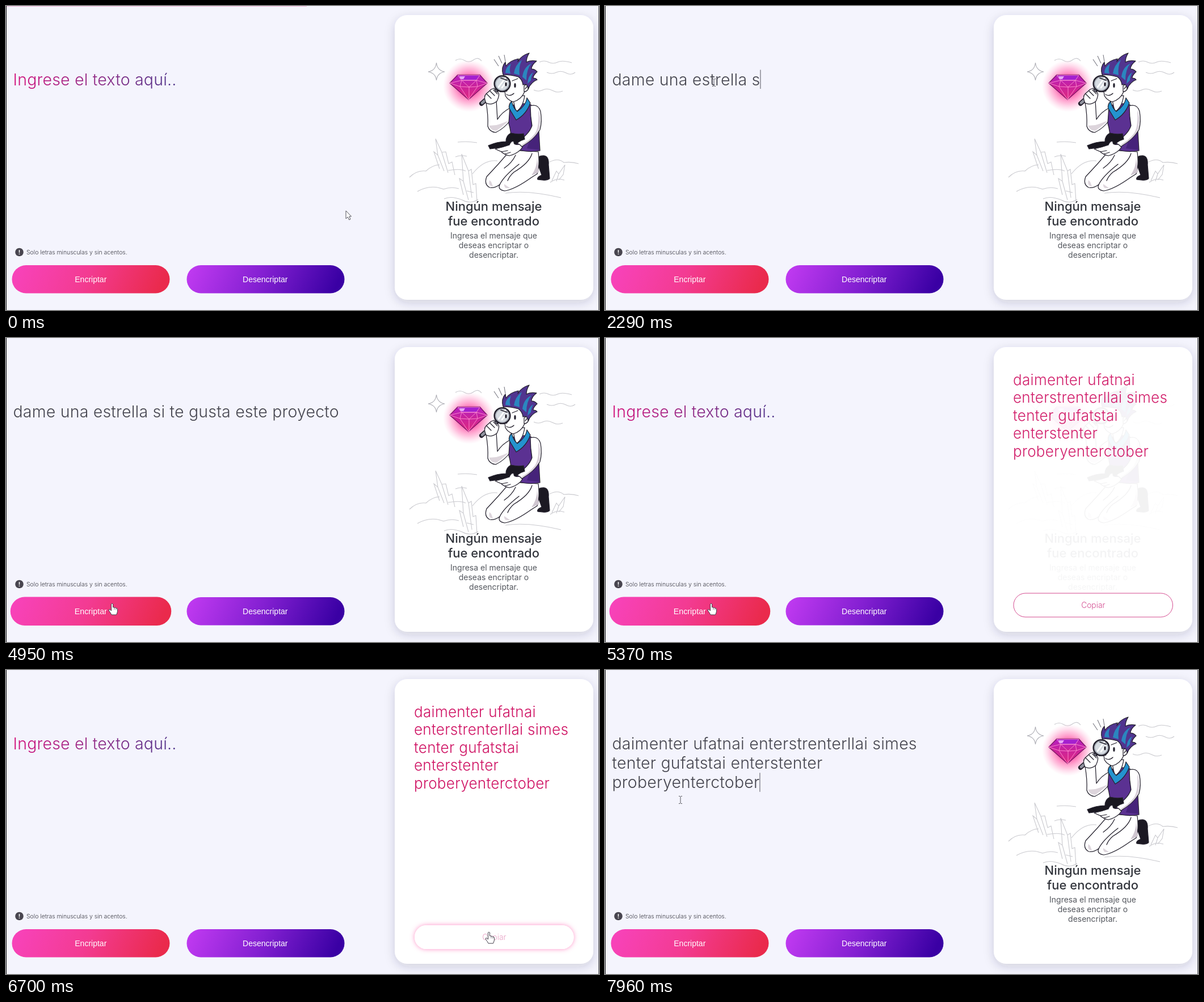
Recreate the animation shown at these times as an HTML page. Size 1045 by 536 pixels, loop 8 s.

```html
<!DOCTYPE html>
<html lang="es">
<head>
<meta charset="utf-8">
<style>
html, body { margin: 0; width: 100%; height: 100%; overflow: hidden; background: #f4f4fd; }
svg { display: block; width: 100%; height: 100%; }
text { font-family: Inter, sans-serif; font-optical-sizing: none; white-space: pre; }
.input { font-size: 28.5px; font-weight: 300; letter-spacing: .2px; fill: #46464f; }
.output { font-size: 26.1px; font-weight: 300; letter-spacing: .25px; fill: #cf1263; }
.title { font-size: 22px; font-weight: 500; fill: #32353c; text-anchor: middle; }
.body { font-size: 14px; fill: #55585f; text-anchor: middle; }
.note { font-size: 10.4px; font-weight: 300; fill: #3c3c44; }
.label { font: 14px "Liberation Sans", Arial, sans-serif; fill: #fff; text-anchor: middle; }
.sketch { fill: none; stroke: #c9c9ce; stroke-width: 1.1; }
.ink { stroke: #25222e; stroke-width: 1.25; stroke-linejoin: round; stroke-linecap: round; }
</style>
</head>
<body>
<svg viewBox="0 0 1045 536" preserveAspectRatio="none">
<defs>
  <linearGradient id="pink" x2="1" y2=".08"><stop stop-color="#f843bd"/><stop offset=".5" stop-color="#f33b92"/><stop offset="1" stop-color="#ea2a4c"/></linearGradient>
  <linearGradient id="violet" x2="1" y2=".08"><stop stop-color="#c33bf2"/><stop offset=".5" stop-color="#8420d2"/><stop offset="1" stop-color="#3a00a4"/></linearGradient>
  <linearGradient id="hint" gradientUnits="userSpaceOnUse" x1="12" y1="0" x2="320" y2="0"><stop stop-color="#d3107c"/><stop offset=".5" stop-color="#8c2a86"/><stop offset="1" stop-color="#403088"/></linearGradient>
  <linearGradient id="gem" x2="0" y2="1"><stop stop-color="#b21fc4"/><stop offset=".4" stop-color="#c8229f"/><stop offset="1" stop-color="#e02a80"/></linearGradient>
  <radialGradient id="halo"><stop offset=".35" stop-color="#ff4fa3" stop-opacity=".9"/><stop offset=".7" stop-color="#ff7dba" stop-opacity=".45"/><stop offset="1" stop-color="#ffb0d5" stop-opacity="0"/></radialGradient>
  <filter id="shade" x="-20%" y="-20%" width="140%" height="140%"><feDropShadow dx="0" dy="5" stdDeviation="8.5" flood-color="#30304a" flood-opacity=".18"/></filter>
  <filter id="glow" x="-20%" y="-60%" width="140%" height="220%"><feDropShadow dx="0" dy="0" stdDeviation="4" flood-color="#ff5fae" flood-opacity=".7"/></filter>
</defs>

<rect width="1045" height="536" fill="#f4f4fd"/>
<path id="topLine" d="M0 .5H530" stroke="#f3b4d8"/>
<path d="M.5 0V536" stroke="#17171c"/>
<path d="M1044.5 0V536" stroke="#55555c"/>
<rect x="685" y="16" width="350" height="502" rx="22" fill="#fff" filter="url(#shade)"/>

<g id="input"></g>
<path id="caret" stroke="#55555f"/>

<circle cx="23.5" cy="434" r="7.3" fill="#48454f"/>
<path d="M23.5 430V435M23.5 436.6V438" stroke="#fff" stroke-width="1.5"/>
<text class="note" x="36" y="438">Solo letras minusculas y sin acentos.</text>

<g id="encrypt"><rect x="10.5" y="457" width="278" height="49.5" rx="24.75" fill="url(#pink)"/><text class="label" x="149.3" y="487">Encriptar</text></g>
<g id="decrypt"><rect x="318.5" y="457" width="278" height="49.5" rx="24.75" fill="url(#violet)"/><text class="label" x="456.8" y="487">Desencriptar</text></g>

<g id="empty">
  <g class="sketch">
    <path d="M758.5 100Q760 114 773 116Q760 118 758.5 131Q757 118 744 116Q757 114 758.5 100Z" stroke="#aaaab2"/>
    <path d="M792 96Q800 91 808 96T824 95T838 97M940 99Q948 95 956 99T972 99T997 100M953 117Q962 121 970 117T987 118T1003 117M930 148Q938 152 946 148T963 149T981 150"/>
    <path d="M796 240Q813 238 830 241M792 266Q802 262 812 265"/>
    <path d="M860 94L868 106M868 88L874 101M878 86L880 98" stroke="#777780"/>
    <path d="M711 302Q724 289 740 291Q752 280 764 280M725 327Q748 314 771 323Q784 318 798 322M779 290Q800 286 810 291M822 296Q842 270 866 273M958 275Q973 267 983 276Q996 274 1009 278M959 311Q971 302 984 307M880 330Q920 324 978 338M772 340Q784 334 804 342Q818 350 832 341"/>
    <path d="M764 287L754 257L761 263L757 234L768 258L775 257L780 278L786 275L791 298M761 263L772 291M768 258L779 294"/>
    <path d="M806 333L799 304L806 309L803 261L815 291L820 288L823 315L828 313L830 345M806 309L815 342M815 291L821 338M812 326L824 329"/>
    <path d="M962 308L970 291L974 296L985 280L982 297L974 307M974 296L970 309"/>
  </g>
  <circle cx="816" cy="141" r="46" fill="url(#halo)"/>
  <g stroke="#ff8fd0" stroke-width=".9" stroke-linejoin="round">
    <path d="M782 136L796 121.500H835L848 136L815 165Z" fill="url(#gem)" stroke="#7d1566" stroke-width="1.300"/>
    <path d="M796 122H835L829 131H803Z" fill="#a420cf"/>
    <path d="M782 136L803 131L829 131L848 136M782 136L800 142L815 165L831 142L848 136M800 142L803 131L816 143L829 131L831 142L816 143L800 142M816 143V165" fill="none"/>
    <path d="M799 124H809L806 129H801Z" fill="#e7a5f5" stroke="none"/>
  </g>

  <g class="ink" fill="#fff">
    <path d="M935 272Q937 263 949 264Q957 266 956 280L958 304Q955 309 937 306Q935 302 944 298Z" fill="#1c1923"/>
    <path d="M889 254Q868 279 847 301Q842 314 852 320Q860 322 870 315Q866 324 879 326Q897 323 925 303L936 296Q941 281 938 257Z"/>
    <path d="M927 260Q922 277 895 293Q887 300 884 308M870 315Q877 300 904 279M898 263Q892 276 878 286" fill="none"/>
    <path d="M926 299Q936 284 936 268L939 293Z" fill="#cfc6d0" stroke="none"/>
    <path d="M852 307Q849 317 858 318L855 310ZM878 314Q877 323 888 321Z" fill="#ddd5dc" stroke="none"/>
    <path d="M846 170Q850 193 849 212Q852 222 863 223Q878 216 889 201L888 180Q874 187 866 200Q865 184 864 166Z"/>
    <path d="M851 211Q855 220 864 220Q877 211 886 202Q872 208 864 210Z" fill="#ddd5dc" stroke="none"/>
    <path d="M888 177Q908 169 925 174Q931 189 938 204L941 255Q915 260 889 249Q892 227 886 207Z" fill="#5b3192"/>
    <path d="M923 190Q929 222 918 251L940 254L937 207Z" fill="#46237a" stroke="none"/>
    <path d="M924 176Q938 172 942 186Q945 203 941 218Q932 234 909 248L899 240Q921 228 927 211Q924 194 924 176Z"/>
    <path d="M938 183Q940 213 932 225Q922 238 906 246L914 244Q935 231 940 215Q943 194 938 183Z" fill="#d9d0da" stroke="none"/>
    <path d="M850 246Q866 239 881 239Q881 228 890 224Q902 227 912 225L914 235Q900 239 898 248Q878 248 853 252Z" fill="#191720"/>
    <path d="M862 252Q876 249 887 245Q891 236 895 239Q894 246 905 244L910 249Q903 260 887 264Q878 262 873 257Z"/>
    <path d="M884 255L873 257M889 258L879 261" fill="none"/>
    <path d="M894 158Q894 173 899 186Q911 179 914 158Z"/>
    <path d="M891 168Q885 174 887 181L899 201Q917 191 924 171L918 162Q916 176 901 186Q894 180 891 168Z" fill="#2493cf"/>
    <path d="M877 119Q875 138 879 150L880 158Q884 166 894 169Q908 165 914 151L918 136L911 116Z"/>
    <path d="M913 141Q921 134 922 142Q920 151 913 151ZM915 146L919 141"/>
    <path d="M892 132L902 128M882 156Q889 160 895 154M883 150L879 151" fill="none"/>
    <ellipse cx="897" cy="140" rx="1.700" ry="4" fill="#25222e" stroke="none"/>
    <path d="M876 121Q872 108 880 99L881 106Q888 96 903 93L902 98Q908 87 922 83Q917 91 917 99Q924 95 935 97Q926 104 926 111Q932 111 936 116Q929 122 929 127Q934 127 936 130Q926 134 920 146Q919 136 911 139Q910 130 903 125Q891 121 876 121Z" fill="#51358f"/>
    <path d="M880 118Q880 108 890 102Q886 111 889 119ZM895 119Q897 104 909 95Q903 108 905 122ZM910 125Q912 108 926 101Q917 112 917 131ZM919 137Q920 122 929 117Q925 125 925 131Z" fill="#2b86bf" stroke="none"/>
    <path d="M864 149L838 172" stroke-width="8"/>
    <path d="M863 150L839 171" stroke="#9294a0" stroke-width="4.500"/>
    <path d="M846 171Q841 160 846 155L855 147L860 145L863 150L868 153Q870 158 865 168Q855 176 846 171Z"/>
    <path d="M847 155L855 163M853 150L861 158M859 148L866 155" fill="none"/>
    <circle cx="874.500" cy="137" r="13.800" fill="#d7dce2" stroke-width="2.600"/>
    <circle cx="874.500" cy="137" r="11.500" fill="none" stroke="#9ba2ad" stroke-width="1.200"/>
    <path d="M868 143L880 127M874 144L883 132" stroke="#fff" stroke-width="2.500"/>
    <path d="M872 127L883 131" stroke-width="1.700"/>
    <ellipse cx="881" cy="138" rx="1.600" ry="3.500" fill="#25222e" stroke="none"/>
  </g>
  <text class="title" x="859.500" y="360.500">Ningún mensaje</text>
  <text class="title" x="859.500" y="387">fue encontrado</text>
  <text class="body" x="859.500" y="409.500">Ingresa el mensaje que</text>
  <text class="body" x="859.500" y="426.500">deseas encriptar o</text>
  <text class="body" x="859.500" y="443.500">desencriptar.</text>
</g>

<g id="output"></g>
<g id="copy">
  <rect id="copyGlow" x="720" y="450" width="280.500" height="42" rx="21" fill="#fff" filter="url(#glow)"/>
  <rect id="copyEdge" x="720" y="450" width="280.500" height="42" rx="21" fill="#fff" stroke="#d2428a"/>
  <text id="copyText" x="860.300" y="475.500" text-anchor="middle" style="font-size:13.8px;font-weight:300;fill:#d2428a">Copiar</text>
</g>

<g id="arrow" fill="#fff" stroke="#55555c"><path d="M0 0V14L3.300 11L5.600 16L8 15L5.800 10H9.500Z"/></g>
<g id="beam" fill="none" stroke="#55555c"><path d="M-3 -6.500H-1L0 -5.500L1 -6.500H3M0 -5.500V5.500M-3 6.500H-1L0 5.500L1 6.500H3"/></g>
<g id="hand" fill="#fff" stroke="#44404c" stroke-linejoin="round"><path d="M-1.500 1Q0 -1 1.500 1V7Q3 6 4 7.500Q6 6.700 7 8.500Q9 8 9.500 10V14Q9 17 7.500 20H-1Q-3 16 -5.500 13Q-6.500 10 -4 10.500L-1.500 13Z"/><path d="M4 8V11M7 9V11.500" stroke-width=".7"/></g>
</svg>
<script>
const $ = id => document.getElementById(id);
const LOOP = 8000, X0 = 12.5, BASE = 139.5, LEAD = 34.4;
const FIRST = 'dame una estrella si te gusta estre';
const FINAL = 'dame una estrella si te gusta este proyecto';
const PASTED = ['daimenter ufatnai enterstrenterllai simes', 'tenter gufatstai enterstenter', 'proberyenterctober'];
const RESULT = ['daimenter ufatnai', 'enterstrenterllai simes', 'tenter gufatstai', 'enterstenter', 'proberyenterctober'];
const KEY = 63, TYPE_AT = 1050, TYPE_END = TYPE_AT + 47 * KEY;
const FOCUS = 830, ENCRYPT = 5130, COPY = 6880, REFOCUS = 7630, PASTE = 7750;

// Pointer moves: start, end, from x, from y, to x, to y
const MOVES = [
  [80, 780, 599, 361, 192, 135],
  [4280, 4880, 192, 135, 187, 468],
  [5550, 6224, 187, 468, 851, 462],
  [7180, 7600, 851, 462, 133, 229]
];

const ramp = (t, a, b) => {
  const u = Math.min(1, Math.max(0, (t - a) / (b - a)));
  return u * u * (3 - 2 * u);
};
const show = (id, on) => $(id).setAttribute('opacity', +on);
const lines = (list, cls, x, y, lead, fill) => list.map((s, i) =>
  `<text class="${cls}" x="${x}" y="${y + i * lead}"${fill ? ` style="fill:${fill}"` : ''}>${s}</text>`).join('');

function typed(t) {
  if (t >= PASTE) return PASTED;
  if (t >= ENCRYPT) return [''];
  const n = Math.max(0, Math.floor((t - TYPE_AT) / KEY));
  if (n <= 35) return [FIRST.slice(0, n)];
  return n <= 37 ? [FIRST.slice(0, 70 - n)] : [FINAL.slice(0, n - 4)];
}

function pointer(t) {
  let [, , x, y] = MOVES[0];
  for (const [a, b, x1, y1, x2, y2] of MOVES) {
    if (t < a) break;
    const u = ramp(t, a, b);
    x = x1 + (x2 - x1) * u;
    y = y1 + (y2 - y1) * u;
  }
  return [x, y];
}

function caretOn(t) {
  if (t < FOCUS || (t >= ENCRYPT && t < REFOCUS)) return false;
  const since = t >= PASTE ? PASTE : t >= REFOCUS ? REFOCUS : t >= TYPE_END ? TYPE_END : t;
  return Math.floor((t - since) / 530) % 2 === 0;
}

function grow(id, cx, amount) {
  $(id).setAttribute('transform', `translate(${cx} 481.75) scale(${1 + .02 * amount}) translate(${-cx} -481.75)`);
}

let shown;
function draw(t) {
  const rows = typed(t), key = rows.join('|');
  if (key !== shown) {
    $('input').innerHTML = key ? lines(rows, 'input', X0, BASE, LEAD)
      : lines(['Ingrese el texto aquí..'], 'input', X0, BASE, LEAD, 'url(#hint)');
    shown = key;
  }
  const cx = X0 + (key ? $('input').lastChild.getComputedTextLength() : 0) + .5;
  const cy = BASE + (rows.length - 1) * LEAD;
  $('caret').setAttribute('d', `M${cx} ${cy - 27}V${cy + 6.5}`);
  show('caret', caretOn(t));
  show('topLine', t < 70);

  const fade = ramp(t, ENCRYPT, ENCRYPT + 280) - ramp(t, COPY, COPY + 330);
  show('empty', 1 - fade);
  show('copy', t < COPY ? fade : Math.sqrt(fade));
  show('output', t < COPY ? fade : 0);

  const hover = ramp(t, 6080, 6300) - ramp(t, 7200, 7400);
  show('copyGlow', hover);
  $('copyEdge').setAttribute('stroke-opacity', 1 - hover);
  show('copyText', 1 - .5 * hover);

  grow('encrypt', 149.5, ramp(t, 4720, 4920) - ramp(t, 5715, 5980));
  grow('decrypt', 457.5, ramp(t, 5700, 5880) - ramp(t, 5941, 6140));

  const [x, y] = pointer(t);
  const onButton = y > 452 && y < 507 && (x < 289 || (x > 317 && x < 598) || (x > 719 && x < 1001));
  const kind = onButton ? 'hand' : x < 597 && y < 410 ? 'beam' : 'arrow';
  for (const id of ['arrow', 'beam', 'hand']) show(id, id === kind);
  $(kind).setAttribute('transform', `translate(${x} ${y})`);
}

$('output').innerHTML = lines(RESULT, 'output', 719, 82.8, 31.5);
const begin = performance.now();
function frame() {
  draw((performance.now() - begin) % LOOP);
  requestAnimationFrame(frame);
}
draw(0);
requestAnimationFrame(frame);
</script>
</body>
</html>
```
